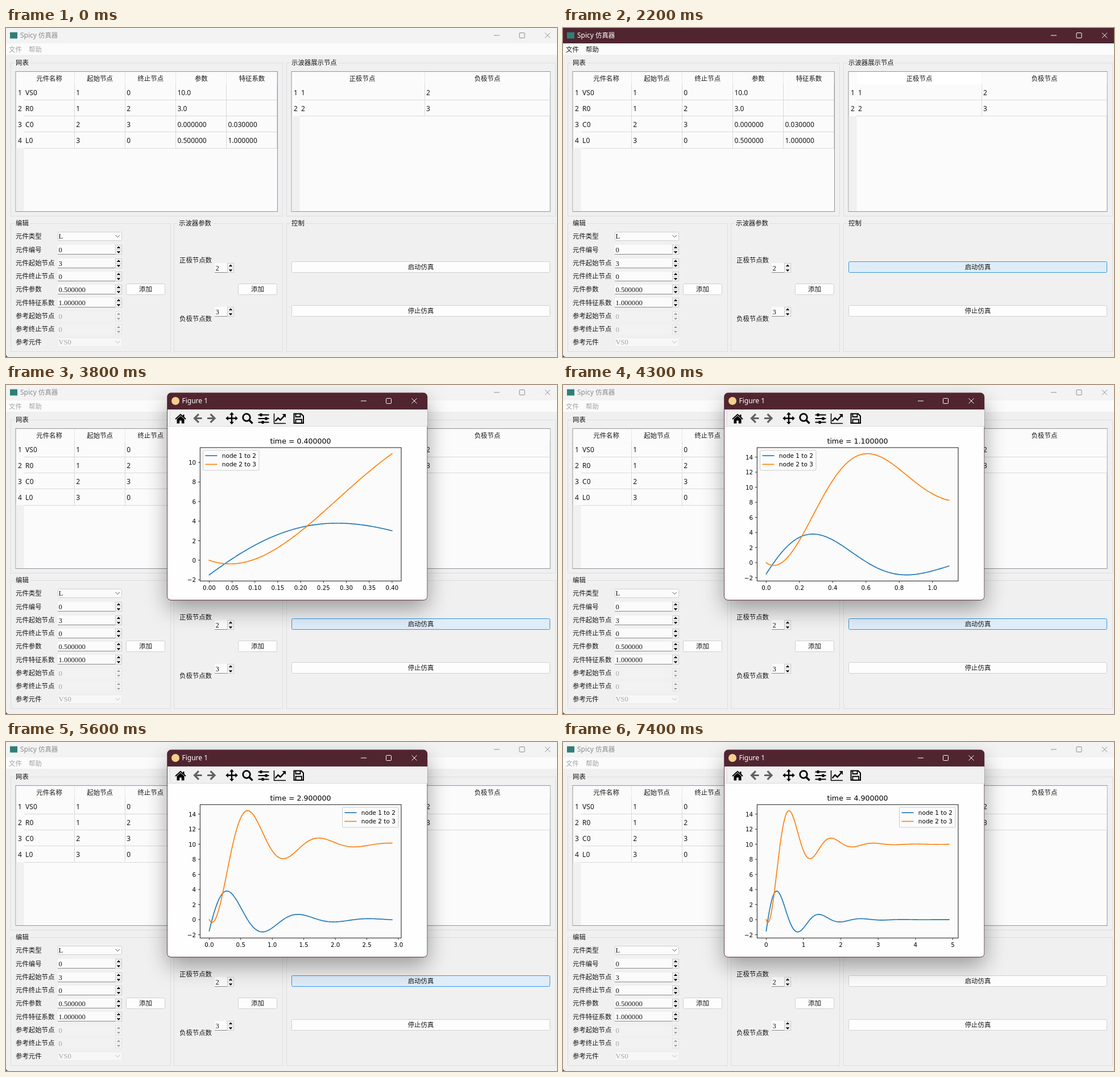
An HTML page for the animation above (7.5 s loop, 969 by 578 pixels).

```html
<!DOCTYPE html>
<html lang="zh">
<head>
<meta charset="utf-8">
<title>Spicy 仿真器</title>
<style>
html, body { margin: 0; width: 100%; height: 100%; overflow: hidden; background: #f0f0f0; }
svg { display: block; width: 969px; height: 578px; }
text { fill: #151515; white-space: pre; }
.zh { font: 11.4px "Noto Sans CJK SC", "Noto Sans CJK", sans-serif; }
.ui { font: 12px "Noto Sans", "Open Sans", sans-serif; }
.field { font: 12.6px "Liberation Serif", serif; }
.tick { font: 10.3px "DejaVu Sans", sans-serif; fill: #000; }
.head { font: 12.6px "DejaVu Sans", sans-serif; fill: #000; }
.mid { text-anchor: middle; }
.end { text-anchor: end; }
.off { fill: #a3a3a3; }
</style>
</head>
<body>
<svg id="stage" viewBox="0 0 969 578" xmlns="http://www.w3.org/2000/svg"></svg>
<script>
const LOOP = 7500, STEP = 100;
const WINE = '#50252f', BLUE = '#1f77b4', ORANGE = '#ff7f0e';

const rect = (x, y, w, h, fill, more = '') =>
  `<rect x="${x}" y="${y}" width="${w}" height="${h}" fill="${fill}" ${more}/>`;
const path = (d, stroke, width = 1, more = '') =>
  `<path d="${d}" fill="none" stroke="${stroke}" stroke-width="${width}" ${more}/>`;
const shape = (d, fill = '#000') => `<path d="${d}" fill="${fill}"/>`;
// y is the middle of the line of text
const text = (x, y, s, cls, more = '') =>
  `<text x="${x}" y="${y + 4.2}" class="${cls}" ${more}>${s}</text>`;
const framed = (x, y, w, h, fill, stroke, r = 0) =>
  rect(x + .5, y + .5, w - 1, h - 1, fill, `stroke="${stroke}" rx="${r}"`);

function group(x, y, w, h, title) {
  const len = [...title].length * 11.4;
  return framed(x, y, w, h, 'none', '#dedede') +
    rect(x + 7, y - 3, len + 4, 8, '#f0f0f0') + text(x + 9, y, title, 'zh');
}

function table(x, w, cols, heads, rows) {
  const rowY = i => 126.5 + i * 28.2;
  const last = Math.round(rowY(rows.length - 1));
  const width = (x + w - 1 - cols) / heads.length;
  let s = framed(x, 76, w, 247, '#fbfbfb', '#8f949b');
  s += rect(x + 1, last, cols - x - 1, 322 - last, '#f0f0f0');
  heads.forEach((head, i) => {
    const right = Math.round(cols + (i + 1) * width) - .5;
    s += path(`M${right} 77V99`, '#e8e8e8') + path(`M${right} 99V${last}`, '#d9d9d9');
    s += text(cols + (i + .5) * width, 88.7, head, 'zh mid');
  });
  rows.forEach((row, r) => {
    const y = Math.floor(rowY(r)) + .5, mid = 113.3 + r * 28.1;
    s += path(`M${cols} ${y}H${x + w - 1}`, '#d9d9d9');
    s += text((x + cols) / 2 + .5, mid, r + 1, 'ui mid');
    row.forEach((cell, c) => { s += text(cols + c * width + 2.6, mid, cell, 'ui'); });
  });
  return s;
}

function spin(x, y, w, value, off) {
  const bx = x + w - 12, ink = off ? '#a0a0a0' : '#000', edge = off ? '#dfdfdf' : '#c9c9c9';
  let s = rect(x, y - 8, w, 17, off ? '#f2f2f2' : '#fbfbfb');
  if (!off) s += path(`M${x} ${y + 8.5}H${x + w}`, '#8a8a8a');
  s += framed(bx, y - 8, 12, 9, '#f8f8f8', edge) + framed(bx, y, 12, 9, '#f8f8f8', edge);
  s += shape(`M${bx + 2.7} ${y - 2}h6.6l-3.3 -3.8z`, ink);
  s += shape(`M${bx + 2.7} ${y + 3.2}h6.6l-3.3 3.8z`, ink);
  return s + text(x + 1.5, y + .5, value, off ? 'field off' : 'field');
}

function combo(y, value, off) {
  const edge = off ? '#ececec' : '#cfcfcf';
  return framed(91, y - 8, 113, 16, off ? '#f7f7f7' : '#fbfbfb', edge, 1) +
    path(`M192.5 ${y - 2}l3.7 3.7l3.7 -3.7`, off ? '#b5b5b5' : '#555') +
    text(92.5, y + .2, value, off ? 'field off' : 'field');
}

const button = (x, y, w, label, fill = '#fdfdfd', edge = '#d0d0d0') =>
  framed(x, y, w, 20, fill, edge, 2) + text(x + w / 2, y + 9.8, label, 'zh mid');

// minimise, maximise and close marks
const controls = (xs, y, ink) =>
  path(`M${xs[0] - 5} ${y}h10`, ink) +
  rect(xs[1] - 4.5, y - 4.5, 9, 9, 'none', `stroke="${ink}" rx="1"`) +
  path(`M${xs[2] - 4.5} ${y - 4.5}l9 9m0 -9l-9 9`, ink);

function desk() {
  let s = rect(0, 0, 969, 578, '#f0f0f0');
  s += group(8, 61, 479, 270, '网表') + group(493, 61, 474, 270, '示波器展示节点');
  s += group(8, 343, 282, 226, '编辑') + group(295, 343, 192, 226, '示波器参数');
  s += group(493, 343, 474, 226, '控制');
  s += table(16.5, 461.5, 31.5, ['元件名称', '起始节点', '终止节点', '参数', '特征系数'], [
    ['VS0', '1', '0', '10.0', ''],
    ['R0', '1', '2', '3.0', ''],
    ['C0', '2', '3', '0.000000', '0.030000'],
    ['L0', '3', '0', '0.500000', '1.000000']
  ]);
  s += table(501.5, 456, 516.5, ['正极节点', '负极节点'], [['1', '2'], ['2', '3']]);
  const fields = [['元件类型', 'L'], ['元件编号', '0'], ['元件起始节点', '3'],
    ['元件终止节点', '0'], ['元件参数', '0.500000'], ['元件特征系数', '1.000000'],
    ['参考起始节点', '0'], ['参考终止节点', '0'], ['参考元件', 'VS0']];
  fields.forEach(([label, value], i) => {
    const y = 366.2 + i * 23.25, off = i > 5;
    s += text(17, y, label, 'zh');
    s += i % 8 ? spin(91, Math.round(y), 113, value, off) : combo(Math.round(y), value, off);
  });
  s += button(211, 449, 69, '添加') + button(408, 449, 69, '添加');
  s += text(305, 407.7, '正极节点数', 'zh') + spin(367, 421, 34, '2');
  s += text(305, 511, '负极节点数', 'zh') + spin(367, 498, 34, '3');
  return s + button(502, 487, 455, '停止仿真');
}

function bars(active, menuOn) {
  const ink = active ? '#fff' : '#8c8c8c';
  let s = rect(0, 0, 969, 27, active ? WINE : '#f3f3f3') + rect(0, 27, 969, 20, '#fbfbfb');
  s += rect(7, 7.5, 13, 11, '#2f7f77');
  s += text(25, 13, 'Spicy', 'ui', `style="fill:${ink}"`);
  s += text(57, 13, '仿真器', 'zh', `style="fill:${ink}"`);
  s += controls([863, 907.5, 952.5], 13, ink);
  const cls = menuOn ? 'zh' : 'zh off';
  return s + text(5, 37.5, '文件', cls) + text(40, 37.5, '帮助', cls);
}

function toolbar() {
  const grey = '#626262', arrow = 'h-9l4.5 -4.8l-2.2 -2.2l-8.6 8.5l8.6 8.5l2.2 -2.2l-4.5 -4.8h9z';
  let s = rect(284, 43, 457, 30, '#f0f0f0') + path('M284 72.5H740.5', '#dadada');
  s += path('M288.5 47V70', '#bdbdbd', 1, 'stroke-dasharray="1 2"');
  s += path('M298 60l9 -8.2l9 8.2', '#000', 2);
  s += shape('M300.5 60l6.5 -5.8l6.5 5.8v7.5h-4.7v-5h-3.6v5h-4.7zM311 52h2.5v5l-2.5 -2z');
  s += shape('M344.5 57' + arrow, grey);
  s += `<g transform="translate(698.5 0) scale(-1 1)">${shape('M344.5 57' + arrow, grey)}</g>`;
  s += path('M389 58.5h16M397 50.5v16', '#000', 2.4);
  for (let a = 0; a < 360; a += 90)
    s += `<g transform="rotate(${a} 397 58.5)">${shape('M397 47.8l4 4.4h-8z')}</g>`;
  s += `<circle cx="423" cy="57" r="6.3" fill="none" stroke="#000" stroke-width="2.8"/>`;
  s += path('M427.5 61.5l6 6', '#000', 3.4);
  [[52.5, 448], [59, 457], [65.5, 451]].forEach(([y, x]) => {
    s += path(`M443.5 ${y}h19`, '#000', 2) + rect(x - 1.5, y - 2.5, 4, 5, '#000');
  });
  s += path('M471.5 50V67.5H492', '#000', 1.5);
  s += path('M473.5 63.5l5 -5.5l4 3.5l7.5 -8', '#000', 2.4) + shape('M485.5 51h6.5v6.5z');
  s += path('M506.5 50.5h12.5l4 4v12.5h-16.5z', '#000', 2);
  s += path('M509.5 51v5h8v-5M509.5 67v-6.5h10.5v6.5', '#000', 1.8);
  return s;
}

// Step response of a series RLC circuit: 10 V, 3 ohm, 1 H, 0.03 F, i(0) = -0.5 A
const DAMP = 1.5, OMEGA = Math.sqrt(1 / .03 - DAMP * DAMP);
const wave = (t, a, b) => Math.exp(-DAMP * t) * (a * Math.cos(OMEGA * t) + b * Math.sin(OMEGA * t));
const resistor = t => wave(t, -1.5, 3 * 10.75 / OMEGA);
const capacitor = t => 10 - wave(t, 10, 5.679);

function ticks(lo, hi) {
  const raw = (hi - lo) / 9, scale = 10 ** Math.floor(Math.log10(raw));
  const base = [1, 2, 2.5, 5, 10].find(b => b * scale >= raw - 1e-9);
  const step = base * scale, list = [];
  let digits = 0;
  while (Math.abs(step * 10 ** digits - Math.round(step * 10 ** digits)) > 1e-6) digits++;
  for (let i = Math.ceil(lo / step); i * step <= hi; i++)
    list.push([i * step, (i < 0 ? '\u2212' : '') + Math.abs(i * step).toFixed(digits)]);
  return list;
}

function plot(end) {
  const L = 341.3, R = 695, T = 110, B = 344.3, N = 200;
  const times = Array.from({ length: N + 1 }, (_, i) => end * i / N);
  const lines = [times.map(resistor), times.map(capacitor)];
  const all = lines.flat(), min = Math.min(...all), max = Math.max(...all);
  const pad = (max - min) * .05, lo = min - pad, hi = max + pad;
  const px = t => L + (R - L) * (t / end + .05) / 1.1;
  const py = v => B - (B - T) * (v - lo) / (hi - lo);
  let s = rect(L, T, R - L, B - T, '#fbfbfb', 'stroke="#000" stroke-width=".9"');
  s += text(518, 98.7, `time = ${end.toFixed(6)}`, 'head mid');
  lines.forEach((line, k) => {
    const d = line.map((v, i) => `${i ? 'L' : 'M'}${px(times[i]).toFixed(2)} ${py(v).toFixed(2)}`).join('');
    s += path(d, k ? ORANGE : BLUE, 1.65, 'stroke-linejoin="round" stroke-linecap="square"');
  });
  ticks(-.05 * end, 1.05 * end).forEach(([v, label]) => {
    s += path(`M${px(v)} ${B}v3.5`, '#000', .8) + text(px(v), 356.2, label, 'tick mid');
  });
  ticks(lo, hi).forEach(([v, label]) => {
    s += path(`M${L} ${py(v)}h-3.5`, '#000', .8) + text(334, py(v) - .2, label, 'tick end');
  });
  // the legend prefers the right corner while it is free of curves
  const taken = lines.some(line => line.some((v, i) => px(times[i]) > 591 && py(v) < 150.5));
  const x = taken ? 346.5 : 591.5;
  s += rect(x, 114.7, 98.5, 35.3, '#fcfcfc', 'fill-opacity=".8" stroke="#ccc" rx="2"');
  ['node 1 to 2', 'node 2 to 3'].forEach((label, k) => {
    const y = 124.2 + k * 15.2;
    s += path(`M${x + 4} ${y}h21`, k ? ORANGE : BLUE, 1.65);
    s += text(x + 33.3, y - .4, label, 'tick', 'style="font-size:10.5px"');
  });
  return s;
}

function figure() {
  return rect(284, 14, 457, 364, '#000', 'rx="7" opacity=".36" filter="url(#shade)"') +
    rect(283.2, 13.6, 458, 364.8, WINE, 'rx="7"') +
    '<circle cx="298" cy="28" r="7" fill="#f2d08c"/>' +
    text(309.5, 28, 'Figure 1', 'ui', 'style="fill:#fff"') +
    controls([629, 673, 718], 28, '#fff') + toolbar() +
    shape('M284 73H740.5V371.6a6 6 0 0 1 -6 6H290a6 6 0 0 1 -6 -6z', '#fefefe');
}

const PACE = [[3400, 0], [3800, .4], [4700, 1.7], [4800, 1.9], [4900, 1.9], [5000, 2.1],
  [5600, 2.9], [6500, 4], [6600, 4.2], [6800, 4.4], [6900, 4.4], [7000, 4.6],
  [7100, 4.6], [7200, 4.7], [7400, 4.9]];

function simTime(ms) {
  const i = PACE.findIndex(p => p[0] >= ms);
  if (i < 1) return 0;
  const [a, u] = PACE[i - 1], [b, v] = PACE[i];
  return Math.round((u + (v - u) * (ms - a) / (b - a)) * 10 + 1e-6) / 10;
}

function startButton(ms) {
  if (ms === 3300) return ['#f6f6f6', '#f4f4f4'];
  if (ms >= 2200 && ms < 6200) return ['#dfedf8', '#3a94da'];
  return [];
}

const stage = document.getElementById('stage');
stage.innerHTML = `<defs><filter id="shade" x="-25%" y="-25%" width="150%" height="160%">
  <feOffset dy="15"/><feGaussianBlur stdDeviation="19"/></filter></defs>
  ${desk()}<g id="hover">${rect(517, 77, 219.5, 22, '#fff')}${text(626.5, 88.7, '正极节点', 'zh mid')}</g>
  <g id="bars"></g><g id="start"></g>${shape('M0 573.5A5 5 0 0 0 4.5 578H0z', '#3a3a3a')}
  <g id="figure">${figure()}<g id="plot"></g></g>`;
const part = id => document.getElementById(id);
const [hover, header, start, fig, chart] = ['hover', 'bars', 'start', 'figure', 'plot'].map(part);

function draw(ms) {
  const open = ms >= 3400, end = simTime(ms);
  header.innerHTML = bars(ms >= 1200 && !open, ms >= 1300 && !open);
  hover.setAttribute('opacity', ms < 1700 ? 0 : ms < 1800 ? .5 : 1);
  start.innerHTML = button(502, 410, 455, '启动仿真', ...startButton(ms));
  fig.setAttribute('visibility', open ? 'visible' : 'hidden');
  const opening = ms === 3400;
  fig.setAttribute('opacity', opening ? .6 : 1);
  fig.setAttribute('transform', opening ? 'translate(512 196) scale(.95) translate(-512 -196)' : '');
  chart.innerHTML = end ? plot(end) : '';
}

let shown = -1;
const origin = performance.now();
function tick() {
  const ms = Math.floor((performance.now() - origin) % LOOP / STEP) * STEP;
  if (ms !== shown) draw(shown = ms);
  requestAnimationFrame(tick);
}
tick();
</script>
</body>
</html>
```
